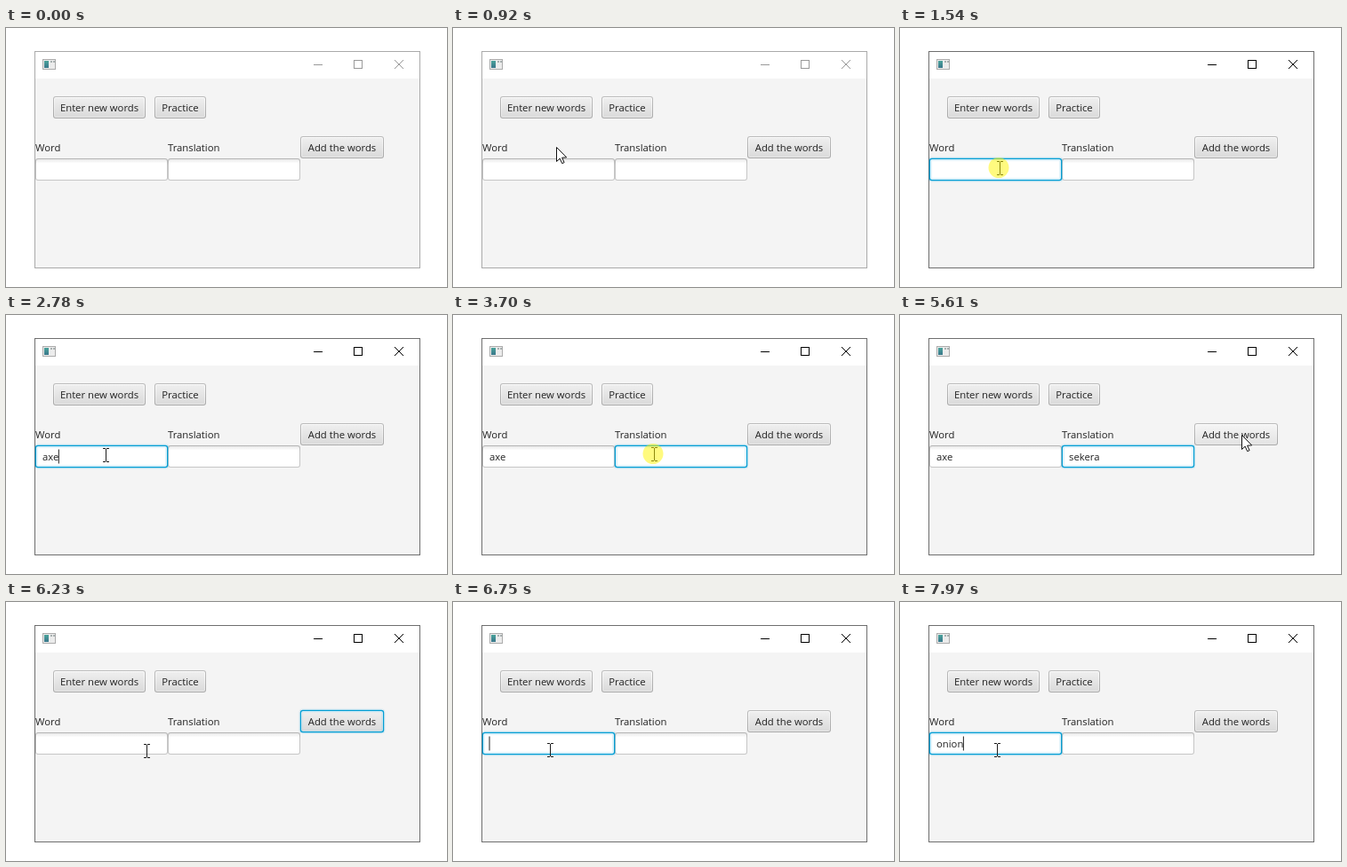
Write an HTML page with a canvas that moves like this. It is 496 px wide and 292 px high and loops after 8 s.

```html
<!DOCTYPE html>
<html lang="en">
<head>
<meta charset="utf-8">
<title>Word trainer</title>
<style>
  html, body { margin: 0; width: 100%; height: 100%; overflow: hidden; background: #fff; }
  canvas { display: block; }
</style>
</head>
<body>
<canvas id="stage" width="496" height="292"></canvas>
<script>
const ctx = document.getElementById('stage').getContext('2d');
const LOOP = 8000, TICK = 50, BLINK = 500;
const FONT = '11.3px "Open Sans", "Noto Sans", sans-serif';
const FOCUS = '#039ed3', FAINT = 'rgba(3,158,211,0.13)';

const box = (x, y, w, label) => ({ x, y, w, h: 25, label });
const WORD = box(33, 147, 149), TRANS = box(182, 147, 149);
const ENTER = box(53, 77, 104, 'Enter new words');
const PRACTICE = box(167, 77, 58, 'Practice');
const ADD = box(331, 122, 94, 'Add the words');

// Pointer moves, each starting where the one before ended; bow sags the path
const MOVES = [
  { at: 570, dur: 350, x: 117, y: 134, bow: 0 },
  { at: 920, dur: 470, x: 112, y: 158, bow: 0 },
  { at: 3180, dur: 450, x: 226, y: 157, bow: 21 },
  { at: 5360, dur: 250, x: 385, y: 135, bow: 0 },
  { at: 5980, dur: 570, x: 109, y: 167, bow: 12 }
];
const ENTRY = { x: 405, y: 271 };

const CLICKS = [
  { at: 1540, on: WORD }, { at: 3700, on: TRANS },
  { at: 5810, on: ADD }, { at: 6700, on: WORD }
];
const CLEAR = 5860;
const TYPING = [
  { on: WORD, text: 'axe', at: 2310, gap: 235 },
  { on: TRANS, text: 's', at: 4000, gap: 1 },
  { on: TRANS, text: 'ekera', at: 4420, gap: 130 },
  { on: WORD, text: 'onion', at: 7470, gap: 125 }
];

const easeOut = k => 1 - (1 - k) ** 3;
const strokes = run => [...run.text].map((_, i) => run.at + i * run.gap);

// Every input restarts the caret blink
const INPUTS = [...CLICKS.map(c => c.at + TICK), ...TYPING.flatMap(strokes)].sort((a, b) => a - b);

function pointerAt(t) {
  if (t < MOVES[0].at) return null;
  const i = MOVES.findLastIndex(m => t >= m.at);
  const to = MOVES[i], from = MOVES[i - 1] || ENTRY;
  const held = Math.floor((t - to.at) / TICK) * TICK;
  const k = easeOut(Math.min(1, held / to.dur));
  return {
    x: Math.round(from.x + (to.x - from.x) * k),
    y: Math.round(from.y + (to.y - from.y) * k + to.bow * Math.sin(Math.PI * k))
  };
}

function valueOf(input, t) {
  return TYPING
    .filter(run => run.on === input && (run.at > CLEAR) === (t >= CLEAR))
    .map(run => run.text.slice(0, strokes(run).filter(s => t >= s).length))
    .join('');
}

function caretOn(t) {
  const last = INPUTS.findLast(at => t >= at);
  return last !== undefined && (t - last) % (2 * BLINK) < BLINK;
}

const hits = (p, r) => !!p && p.x >= r.x && p.x < r.x + r.w && p.y >= r.y && p.y < r.y + r.h;

function rect(x, y, w, h, fill) {
  ctx.fillStyle = fill;
  ctx.fillRect(x, y, w, h);
}

function layer(r, inset, radius, fill) {
  ctx.beginPath();
  ctx.roundRect(r.x + inset, r.y + inset, r.w - 2 * inset, r.h - 2 * inset, radius);
  ctx.fillStyle = fill;
  ctx.fill();
}

function shade(r, top, bottom, end = 1) {
  const g = ctx.createLinearGradient(0, r.y, 0, r.y + r.h * end);
  g.addColorStop(0, top);
  g.addColorStop(1, bottom);
  return g;
}

function text(str, x, y) {
  ctx.fillStyle = '#222';
  ctx.fillText(str, x, y);
}

function button(r, focused, hover) {
  const body = hover ? shade(r, '#f6f6f6', '#e2e2e2') : shade(r, '#f0f0f0', '#d9d9d9');
  const rim = shade(r, '#fdfdfd', '#e6e6e6');
  if (focused) layer(r, -0.2, 3, FOCUS);
  else layer(r, 0, 3, shade(r, '#bcbcbc', '#a9a9a9'));
  layer(r, 1, 2, rim);
  layer(r, 2, 1, body);
  if (focused) {
    layer(r, -1.4, 4, FAINT);
    layer(r, 2.6, 1, body);
  }
  text(r.label, r.x + (r.w - ctx.measureText(r.label).width) / 2, r.y + 17);
}

function field(r, str, focused, caret) {
  if (focused) {
    layer(r, -0.2, 3, FOCUS);
    layer(r, 1, 2, '#fff');
    layer(r, -1.4, 4, FAINT);
    layer(r, 3, 0, '#fff');
  } else {
    layer(r, 0, 3, shade(r, '#b4b4b4', '#c6c6c6', 0.3));
    layer(r, 1, 2, shade(r, '#e4e4e4', '#fff', 0.22));
  }
  text(str, r.x + 8, r.y + 17);
  if (caret) rect(r.x + 7.5 + ctx.measureText(str).width, r.y + 4.5, 1, 16, '#222');
}

function appIcon() {
  rect(41, 35, 15, 12, '#ababab');
  rect(42, 36, 13, 10, '#ececec');
  rect(43, 37, 5, 8, shade({ y: 37, h: 8 }, '#4aa39b', '#39768a'));
  rect(50, 37, 2, 2, '#a8b0b0');
  rect(53, 37, 2, 2, '#a8b0b0');
}

function windowFrame(active) {
  const ink = active ? '#000' : '#999';
  rect(32, 26, 434, 245, active ? '#6e6e6e' : '#aaa');
  rect(33, 27, 432, 30, '#fff');
  rect(33, 57, 432, 213, '#f4f4f4');
  appIcon();
  rect(346, 41, 10, 1, ink);
  ctx.strokeStyle = ink;
  ctx.lineWidth = 1;
  ctx.strokeRect(391.5, 36.5, 9, 9);
  ctx.beginPath();
  ctx.moveTo(437, 36);
  ctx.lineTo(447, 46);
  ctx.moveTo(447, 36);
  ctx.lineTo(437, 46);
  ctx.stroke();
}

function arrow({ x, y }) {
  const shape = [[0, 0], [0, 16], [3.7, 12.6], [6.2, 18.2], [8.6, 17.1], [6.1, 11.7], [11.2, 11.4]];
  ctx.beginPath();
  shape.forEach(([dx, dy]) => ctx.lineTo(x + dx - 0.5, y + dy + 0.5));
  ctx.closePath();
  ctx.fillStyle = '#fff';
  ctx.fill();
  ctx.strokeStyle = '#111';
  ctx.lineWidth = 1;
  ctx.stroke();
}

function beam({ x, y }) {
  const ink = '#1c1c1c';
  rect(x, y - 7, 1, 14, ink);
  for (const edge of [y - 8, y + 7]) {
    rect(x - 3, edge, 3, 1, ink);
    rect(x + 1, edge, 3, 1, ink);
  }
}

function clickGlow({ x, y }) {
  ctx.beginPath();
  ctx.arc(x - 1, y - 0.5, 11.5, 0, Math.PI * 2);
  ctx.fillStyle = 'rgba(255,246,0,0.5)';
  ctx.fill();
}

function draw(t) {
  const pointer = pointerAt(t);
  const click = CLICKS.findLast(c => t >= c.at);
  const focus = click?.on;

  rect(0, 0, 496, 292, '#fff');
  ctx.font = FONT;
  windowFrame(!!click);
  text('Word', 33, 139);
  text('Translation', 182, 139);
  for (const b of [ENTER, PRACTICE, ADD]) button(b, focus === b, hits(pointer, b));

  // The focused field lies on top so its glow stays whole
  const fields = focus === WORD ? [TRANS, WORD] : [WORD, TRANS];
  for (const f of fields) field(f, valueOf(f, t), f === focus, f === focus && caretOn(t));

  if (!pointer) return;
  (fields.some(f => hits(pointer, f)) ? beam : arrow)(pointer);
  if (click && t < click.at + TICK) clickGlow(pointer);
}

const start = performance.now();
function frame() {
  draw((performance.now() - start) % LOOP);
  requestAnimationFrame(frame);
}
frame();
</script>
</body>
</html>
```
